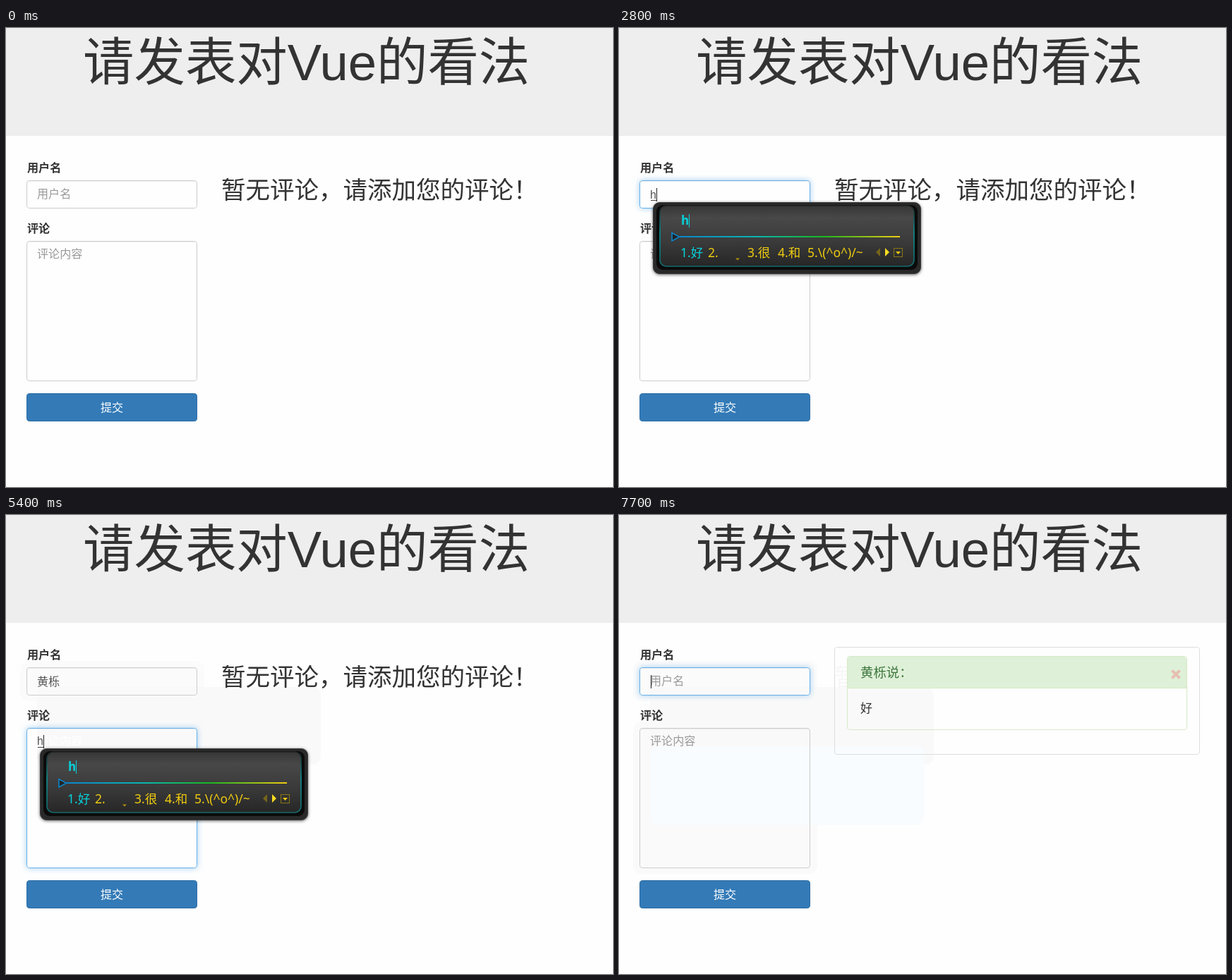
These frames come from a looping animation (860x651 px, 8 s). An HTML page:

```html
<!DOCTYPE html>
<html lang="zh-CN">
<head>
<meta charset="utf-8">
<title>请发表对Vue的看法</title>
<style>
  html, body { margin: 0; width: 100%; height: 100%; overflow: hidden; background: #fefefe; }
  #stage { position: relative; width: 860px; height: 651px; overflow: hidden; }
  #stage > * { position: absolute; box-sizing: border-box; }
  .head { left: 0; top: 0; width: 860px; height: 153px; background: #eee; }
  .mark { border-radius: 12px; }
  .field, .btn { left: 29px; width: 242px; border: 1px solid #ccc; border-radius: 4.6px; }
  .list { left: 305px; top: 187px; width: 518px; height: 153px; border: 1px solid #ddd; border-radius: 4.6px; }
  .card { left: 323px; top: 200px; width: 482px; height: 105px; border: 1px solid #d6e9c6; border-radius: 4.6px; }
  .card::before { content: ""; display: block; height: 44px; background: #dff0d8; border-bottom: 1px solid #d6e9c6; border-radius: 3.6px 3.6px 0 0; }
  svg { left: 0; top: 0; }
  text { font: 16.1px "Liberation Sans", "Noto Sans CJK SC", "Noto Sans CJK", sans-serif; fill: #333; white-space: pre; }
  text.b { font-weight: 700; }
  #ime text { font: 17.5px "Noto Sans", "Noto Sans CJK SC", "Noto Sans CJK", sans-serif; fill: #f0cc10; }
  #ime text.typed { font-weight: 700; font-size: 17px; fill: #06d3dc; }
  #ime text.first { fill: #06d3dc; }
  .shell { filter: drop-shadow(0 1px 2px rgba(0,0,0,.6)); }
</style>
</head>
<body>
<div id="stage">
  <div class="head"></div>
  <div class="mark" id="haloUser" style="left:20px;top:207px;width:261px;height:57px;background:#fbfbfb"></div>
  <div class="mark" id="haloNote" style="left:20px;top:293px;width:261px;height:216px;background:#fafafa"></div>
  <div class="mark" id="ghostUser" style="left:44px;top:244px;width:402px;height:110px;background:#f9f9f9"></div>
  <div class="mark" id="ghostNote" style="left:44px;top:328px;width:388px;height:112px;background:#f8fcff"></div>
  <div class="field" id="userBox" style="top:216px;height:40px"></div>
  <div class="field" id="noteBox" style="top:302px;height:199px"></div>
  <div class="btn" id="btn" style="top:518px;height:40px"></div>
  <div class="list post"></div>
  <div class="card post"></div>
  <svg width="860" height="651" viewBox="0 0 860 651">
    <defs>
      <linearGradient id="face" x2="0" y2="1">
        <stop offset="0" stop-color="#363636"/><stop offset=".2" stop-color="#484848"/>
        <stop offset=".6" stop-color="#3a3a3a"/><stop offset="1" stop-color="#262626"/>
      </linearGradient>
      <linearGradient id="rim" x2="0" y2="1">
        <stop offset="0" stop-color="#222"/><stop offset=".45" stop-color="#0a9294"/>
        <stop offset="1" stop-color="#136a6c"/>
      </linearGradient>
      <linearGradient id="rule">
        <stop offset="0" stop-color="#0a86cc"/><stop offset=".35" stop-color="#08b6b0"/>
        <stop offset=".65" stop-color="#18b820"/><stop offset="1" stop-color="#f0cc10"/>
      </linearGradient>
      <clipPath id="sliver"><rect x="306" y="200" width="17" height="60"/></clipPath>
    </defs>
    <text x="109" y="74" style="font-size:72.45px">请发表对Vue的看法</text>
    <text class="b" x="30" y="204">用户名</text>
    <text class="b" x="30" y="290">评论</text>
    <text x="150" y="544" text-anchor="middle" style="fill:#fff">提交</text>
    <text id="empty" x="305" y="242" style="font-size:34.5px">暂无评论，请添加您的评论！</text>
    <text id="userHint" x="44" y="241">用户名</text>
    <text id="noteHint" x="44" y="326">评论内容</text>
    <text id="user" x="44" y="242" style="fill:#555"></text>
    <text id="note" x="44" y="326" style="fill:#555"></text>
    <rect id="under" x="45" height="1" fill="#444"/>
    <rect id="caret" width="1" height="19" fill="#222"/>
    <g class="post">
      <text x="342" y="230" style="font-size:18.4px;fill:#3c763d">黄栎说：</text>
      <text x="342" y="279.5" style="font-size:17px">好</text>
      <path d="M783.5 220.5l11 11m0-11l-11 11" stroke="#e6bfb1" stroke-width="4"/>
    </g>
    <g id="ime"></g>
  </svg>
</div>
<script>
const LOOP = 8000;
const $ = id => document.getElementById(id);
const posts = document.querySelectorAll('.post');

// Candidate lists: right edge of the panel, start of each item, items
const near = [87, 126, 169, 212, 255];
const wide = [87, 143, 202, 262, 321];
const face = [87, 126, 182, 225, 267];
const one = s => [360, near, [...s]];
const words = ['黄栎', '黄历', '黄鹂', '黄梨', '皇历'];
const lists = {
  h: [428, face, ['好', '', '很', '和', '\\(^o^)/~']],
  hu: one('胡户湖护虎'),
  hua: one('话花化画华'),
  huan: one('换还环欢缓'),
  huang: one('黄皇晃慌煌'),
  huangl: [446, wide, words],
  huangli: [442, wide, words],
  ha: one('哈蛤铪虾奤'),
  hao: one('好号浩豪毫')
};

const start = { btn: 0, caret: '', uf: 0, cf: 0, user: '', note: '', ime: '', mark1: 0, mark2: 0, halo1: 0, halo2: 0, post: 0 };
const typeUser = s => ({ user: s, ime: s, caret: 'user' });
const typeNote = s => ({ note: s, ime: s, caret: 'note' });
const steps = [
  [0, {}],
  [700, { btn: 1 }],
  [1000, { btn: 0 }],
  [1800, { caret: 'user' }],
  [1900, { uf: .6 }],
  [2000, { uf: 1 }],
  [2300, { caret: '' }],
  [2800, typeUser('h')],
  [2900, typeUser('hu')],
  [3000, typeUser('hua')],
  [3100, typeUser('huan')],
  [3200, typeUser('huang')],
  [3300, typeUser('huangl')],
  [3500, typeUser('huangli')],
  [3600, { user: '黄栎', ime: '', mark1: 1 }],
  [4100, { caret: '' }],
  [4600, { caret: 'user' }],
  [4700, { caret: 'note', uf: .4, cf: .6, halo1: 1 }],
  [4800, { uf: 0, cf: 1 }],
  [5200, { caret: '' }],
  [5400, typeNote('h')],
  [5600, typeNote('ha')],
  [5700, typeNote('hao')],
  [5900, { note: '好', ime: '', mark2: 1 }],
  [6400, { caret: '' }],
  [6800, { btn: 1 }],
  [6900, { caret: 'note' }],
  [7100, { btn: 2, caret: '', cf: .4, halo2: 1 }],
  [7200, { cf: 0, user: '', note: '', post: 1 }],
  [7300, { btn: 1 }],
  [7600, { btn: 0, caret: 'user', uf: .6 }],
  [7700, { uf: 1 }]
];
const fills = [['#337ab7', '#2e6da4'], ['#286090', '#204d74'], ['#204d74', '#122b40']];

const show = (el, on) => { el.style.display = on ? '' : 'none'; };

function focus(el, f) {
  const rgb = [102, 175, 233].map(v => Math.round(204 + (v - 204) * f));
  el.style.borderColor = `rgb(${rgb})`;
  el.style.boxShadow = `inset 0 1px 1px rgba(0,0,0,.06), 0 0 9px rgba(102,175,233,${.6 * f})`;
}

function drawIme(typed, dy) {
  const g = $('ime');
  show(g, typed);
  if (!typed) return;
  const [r, xs, items] = lists[typed];
  g.setAttribute('transform', `translate(0 ${dy})`);
  g.innerHTML = `
    <rect class="shell" x="48.5" y="247.5" width="${r - 49}" height="101" rx="9" fill="#292929" stroke="#3b3b3b"/>
    <rect x="53" y="251" width="${r - 58}" height="92" rx="9" fill="#0b0b0b"/>
    <rect x="58" y="252" width="${r - 68}" height="86" rx="9" fill="url(#face)" stroke="url(#rim)" stroke-width="1.6"/>
    <text class="typed" x="88" y="279">${typed}</text>
    <rect class="bar" y="264" width="1" height="19" fill="#06d3dc"/>
    <rect x="86" y="295" width="${r - 116}" height="2" fill="url(#rule)"/>
    <path d="M75 290.5v11.5l10.500-5.750z" fill="#222" stroke="#0a86cc" stroke-width="1.6"/>
    ${items.map((s, i) => `<text class="${i ? '' : 'first'}" x="${xs[i]}" y="324.500">${i + 1}.${s}</text>`).join('')}
    ${xs === face ? '<path d="M165 326.500h6l-3 3z" fill="#b0900c"/>' : ''}
    <path d="M${r - 58} 312v12l-6-6z" fill="#75651a"/>
    <path d="M${r - 51} 312v12l6-6z" fill="#f8dc20"/>
    <rect x="${r - 38.5}" y="312.500" width="12" height="12" fill="none" stroke="#8a7614"/>
    <path d="M${r - 36} 317h7l-3.500 4z" fill="#f0cc10"/>`;
  g.querySelector('.bar').setAttribute('x', Math.round(88 + g.querySelector('.typed').getComputedTextLength()));
}

function render(s) {
  $('user').textContent = s.user;
  $('note').textContent = s.note;
  show($('userHint'), !s.user);
  $('userHint').style.fill = '#999';
  $('noteHint').style.fill = s.note ? '#fff' : '#999';
  focus($('userBox'), s.uf);
  focus($('noteBox'), s.cf);
  [$('btn').style.background, $('btn').style.borderColor] = fills[s.btn];
  show($('ghostUser'), s.mark1);
  show($('ghostNote'), s.mark2);
  show($('haloUser'), s.halo1);
  show($('haloNote'), s.halo2);
  posts.forEach(el => show(el, s.post));
  $('empty').style.fill = s.post ? '#f7f7f7' : '#333';
  $('empty').setAttribute('clip-path', s.post ? 'url(#sliver)' : 'none');

  const inNote = s.note !== '';
  const width = id => s[id] ? $(id).getComputedTextLength() : 0;
  show($('caret'), s.caret);
  if (s.caret) {
    const w = width(s.caret);
    $('caret').setAttribute('x', w ? Math.round(44 + w) : 45);
    $('caret').setAttribute('y', s.caret === 'note' ? 312 : 227);
  }
  show($('under'), s.ime);
  if (s.ime) {
    $('under').setAttribute('width', Math.round(width(inNote ? 'note' : 'user')));
    $('under').setAttribute('y', inNote ? 329 : 244);
  }
  drawIme(s.ime, inNote ? 84 : 0);
}

let last = -1;
const t0 = performance.now();
function tick() {
  const t = (performance.now() - t0) % LOOP;
  const past = steps.filter(([at]) => at <= t);
  if (past.length !== last) {
    last = past.length;
    render(Object.assign({}, start, ...past.map(p => p[1])));
  }
  requestAnimationFrame(tick);
}
tick();
</script>
</body>
</html>
```
